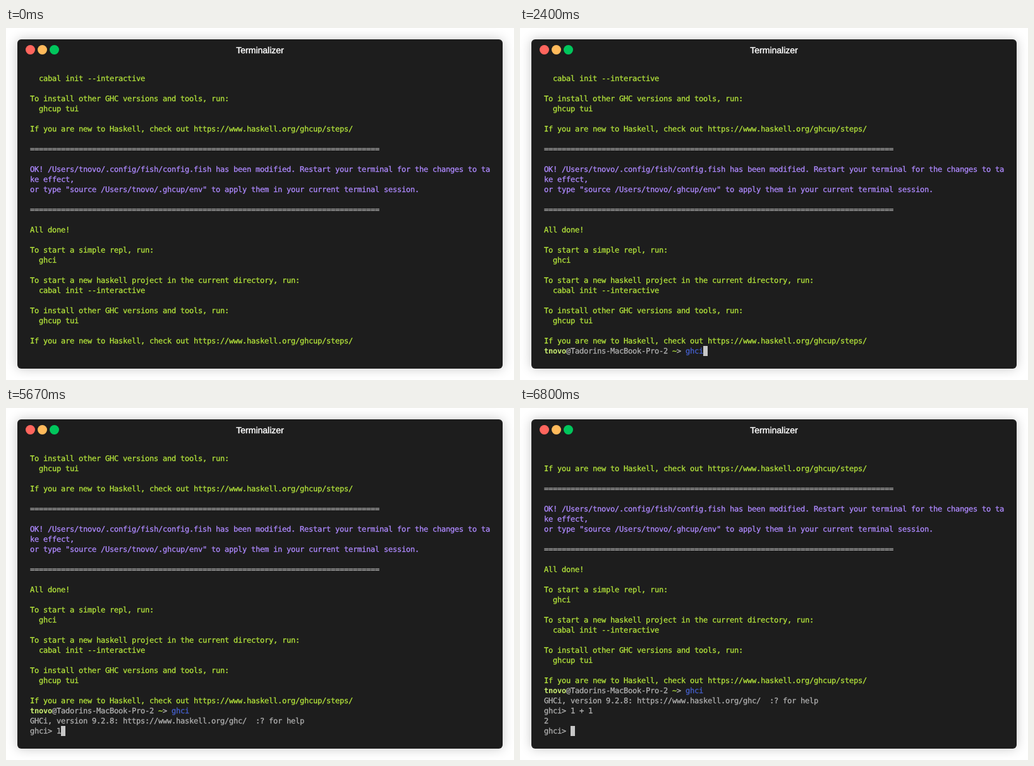
An HTML page that plays this animation: 804 by 558 pixels, repeating every 8 s.

```html
<!DOCTYPE html>
<html lang="en">
<head>
<meta charset="utf-8">
<title>Terminalizer</title>
<style>
html, body { margin: 0; width: 804px; height: 558px; overflow: hidden; background: #fff; }
#win {
  position: absolute; left: 18px; top: 18px; width: 768px; height: 522px;
  border-radius: 6px; background: #1d1d1d; box-shadow: 0 0 18px rgba(0, 0, 0, .22);
}
#title {
  position: absolute; left: 0; right: 0; top: 9px; text-align: center; color: #fff;
  font: 14px/16px "Liberation Sans", Arial, sans-serif; text-rendering: geometricPrecision;
  -webkit-text-stroke: .4px;
}
.dot { position: absolute; top: 9px; width: 15px; height: 15px; border-radius: 50%; }
#screen {
  position: absolute; left: 20px; top: 54px; margin: 0; white-space: pre; color: #afafaf;
  font: 12px/16px "DejaVu Sans Mono", monospace; font-variant-ligatures: none;
  text-rendering: geometricPrecision; -webkit-text-stroke: .3px;
}
#screen div { height: 16px; }
.green { color: #b3e33b; }
.user { color: #c8ed71; font-weight: bold; -webkit-text-stroke: 0; }
.note { color: #ae89fe; }
.cmd { color: #4560cf; }
.bad { color: #d53a2c; }
.hint { color: #626566; }
.cursor { display: inline-block; width: 7px; height: 16px; vertical-align: top; background: #c7c7c7; color: #1d1d1d; }
</style>
</head>
<body>
<div id="win">
  <i class="dot" style="left:13px;background:#ff655d"></i>
  <i class="dot" style="left:32px;background:#ffba5b"></i>
  <i class="dot" style="left:51px;background:#00c65c"></i>
  <div id="title">Terminalizer</div>
  <div id="screen"></div>
</div>
<script>
const LOOP = 8000, ROWS = 28, CELL = 7;
const screenEl = document.getElementById('screen');

const paint = (cls, text) => `<span class="${cls}">${text}</span>`;
const green = text => paint('green', text);
const note = text => paint('note', text);
const cursor = (char = ' ') => paint('cursor', char);

const rule = '='.repeat(79);
const help = [
  '  cabal init --interactive', '',
  'To install other GHC versions and tools, run:', '  ghcup tui', '',
  'If you are new to Haskell, check out https://www.haskell.org/ghcup/steps/'
].map(green);

const log = [
  ...help, '', rule, '',
  note('OK! /Users/tnovo/.config/fish/config.fish has been modified. Restart your terminal for the changes to ta'),
  note('ke effect,'),
  note('or type "source /Users/tnovo/.ghcup/env" to apply them in your current terminal session.'),
  '', rule, '',
  green('All done!'), '',
  green('To start a simple repl, run:'), green('  ghci'), '',
  green('To start a new haskell project in the current directory, run:'),
  ...help
];

const prompt = paint('user', 'tnovo') + '@Tadorins-MacBook-Pro-2 ' + green('~') + '&gt; ';
const shell = (cls, typed, hint = '') =>
  [prompt + paint(cls, typed) + cursor(hint[0]) + paint('hint', hint.slice(1))];

const launched = [prompt + paint('cmd', 'ghci')];
const greeted = [...launched, 'GHCi, version 9.2.8: https://www.haskell.org/ghc/  :? for help'];
const repl = typed => [...greeted, 'ghci&gt; ' + typed + cursor()];
const entered = [...greeted, 'ghci&gt; 1 + 1'];

// [start in ms, lines below the log]
const steps = [
  [0, ['']],
  [40, shell('cmd', '')],
  [2040, shell('bad', 'g', 'hcup')],
  [2130, shell('bad', 'gh', 'cup')],
  [2300, shell('cmd', 'ghc', 'up')],
  [2400, shell('cmd', 'ghci')],
  [2630, [...launched, cursor()]],
  [4630, [...greeted, cursor()]],
  [5000, repl('')],
  [5670, repl('1')],
  [5870, repl('1 ')],
  [6140, repl('1 +')],
  [6260, repl('1 + ')],
  [6450, repl('1 + 1')],
  [6780, [...entered, cursor()]],
  [6800, [...entered, '2', 'ghci&gt; ' + cursor()]]
];

// Snap the font's advance to the terminal's cell grid.
function fitGrid() {
  screenEl.innerHTML = paint('', 'M'.repeat(100));
  const advance = screenEl.firstChild.getBoundingClientRect().width / 100;
  screenEl.style.letterSpacing = CELL - advance + 'px';
}

let shown = null;
function draw(time) {
  const step = steps.findLast(([start]) => start <= time);
  if (step === shown) return;
  shown = step;
  screenEl.innerHTML = [...log, ...step[1]].slice(-ROWS)
    .map(line => `<div>${line}</div>`).join('');
}

fitGrid();
draw(0);
const begin = performance.now();
requestAnimationFrame(function tick() {
  draw((performance.now() - begin) % LOOP);
  requestAnimationFrame(tick);
});
</script>
</body>
</html>
```
